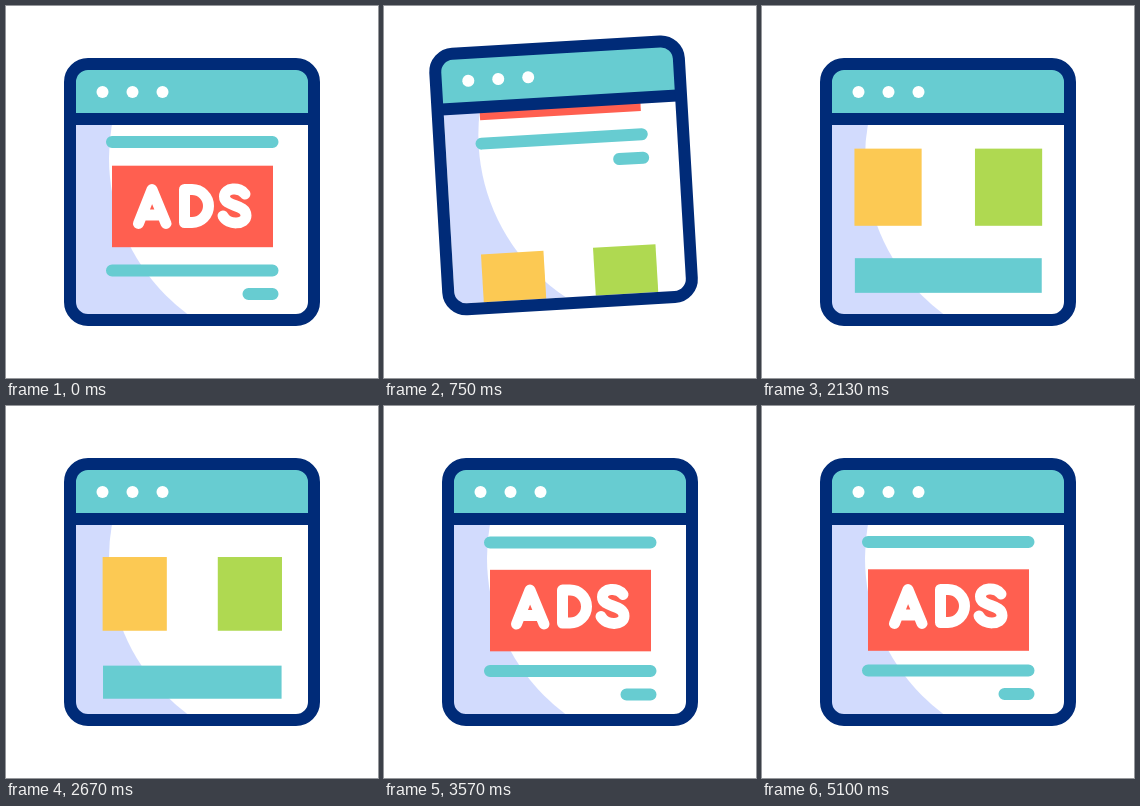
Animation, 372 px wide and 372 px high, one loop 5400 ms. Source, as an HTML page:

```html
<!DOCTYPE html>
<html lang="en">
<head>
<meta charset="utf-8">
<title>Ads window</title>
<style>
  html, body { margin: 0; width: 100%; height: 100%; overflow: hidden; background: #fff; }
  svg { display: block; width: 100vw; height: 100vh; }
  .teal { fill: #67ccd1; }
  .bar { stroke: #67ccd1; stroke-width: 12; stroke-linecap: round; }
  .letters { fill: none; stroke: #fff; stroke-width: 11; stroke-linecap: round; stroke-linejoin: round; }
</style>
</head>
<body>
<svg viewBox="0 0 372 372">
  <defs>
    <clipPath id="page"><rect x="70" y="118" width="232" height="190"/></clipPath>
  </defs>
  <g id="window">
    <rect x="64" y="58" width="244" height="256" rx="18" fill="#fff"/>
    <g clip-path="url(#page)">
      <rect x="70" y="118" width="232" height="190" fill="#d2dbfd"/>
      <circle cx="297.5" cy="152" r="194.5" fill="#fff"/>
      <g id="tiles">
        <rect fill="#fcc953"/>
        <rect fill="#afd951"/>
        <rect class="teal"/>
      </g>
      <g id="advert">
        <path class="bar" d="M106 136H266.5M106 264.5H266.5M242.5 288H266.5"/>
        <rect id="banner" x="106" width="161" height="81.5" fill="#ff5f50"/>
        <g class="letters" role="img" aria-label="ADS">
          <path d="M132.5 217.5L146 183.5L160 217.5M139 209H154"/>
          <path d="M178.5 183.5V216.5H186A16.5 16.5 0 0 0 186 183.5Z"/>
          <path d="M239 188C234 180.5 218.5 181.5 218.5 190.5C218.5 201.5 240 197.5 240 209.5C240 219 222 219.5 217 210"/>
        </g>
      </g>
    </g>
    <path class="teal" d="M64 110V76A18 18 0 0 1 82 58H290A18 18 0 0 1 308 76V110Z"/>
    <g fill="#fff">
      <circle cx="96.5" cy="86" r="6"/>
      <circle cx="126.5" cy="86" r="6"/>
      <circle cx="156.5" cy="86" r="6"/>
    </g>
    <g fill="none" stroke="#002b78" stroke-width="12">
      <path d="M64 113H308"/>
      <rect x="64" y="58" width="244" height="256" rx="18"/>
    </g>
  </g>
</svg>
<script>
const LOOP = 5400, STEP = 30, SWAP = 1800;
const get = id => document.getElementById(id);
const frame = get('window'), advert = get('advert'), banner = get('banner');
const tileNodes = [...get('tiles').children];

// Each track lists [time, value] keys, eased between neighbours.
const tracks = {
  tilt: [[300, 0], [900, 1], [1500, 0]],
  hop: [[4500, 0], [4800, -13], [5100, 0]],
  leave: [[300, 0], [1200, -230]],
  arrive: [[2100, 204], [2540, 220], [3600, 0]],
  size: [[300, .905], [1200, 1.05], [2100, 1.05], [3600, .905]]
};

// Centre offset from the middle, centre y, width, height.
const tiles = [
  [-57.4, 181, 64, 73.5],
  [57.4, 181, 64, 73.5],
  [0, 269.3, 178, 33]
];

const smooth = u => u * u * (3 - 2 * u);

function valueAt(keys, t) {
  if (t <= keys[0][0]) return keys[0][1];
  for (let i = 1; i < keys.length; i++) {
    const [t0, a] = keys[i - 1], [t1, b] = keys[i];
    if (t <= t1) return a + (b - a) * smooth((t - t0) / (t1 - t0));
  }
  return keys[keys.length - 1][1];
}

function setAttrs(node, attrs) {
  for (const name in attrs) node.setAttribute(name, attrs[name]);
}

function draw(t) {
  const at = name => valueAt(tracks[name], t);
  const tilt = at('tilt'), size = at('size');
  const first = t < SWAP;
  const advertY = first ? at('leave') : at('arrive');
  const tilesY = first ? advertY + 230 : advertY - 204;

  setAttrs(frame, {
    transform: `translate(${1.7 * tilt} ${at('hop') - 20 * tilt}) rotate(${-4 * tilt} 186 320)`
  });
  setAttrs(advert, { transform: `translate(0 ${advertY})` });
  setAttrs(banner, { y: first ? 159.7 : 163.3 });

  tiles.forEach(([dx, y, w, h], i) => {
    const width = w * size, height = h * size;
    setAttrs(tileNodes[i], {
      x: 186.3 + dx * size - width / 2,
      y: y + tilesY - height / 2,
      width, height
    });
  });
}

function tick() {
  const t = performance.now() % LOOP;
  draw(Math.floor(t / STEP) * STEP);
  requestAnimationFrame(tick);
}
tick();
</script>
</body>
</html>
```
